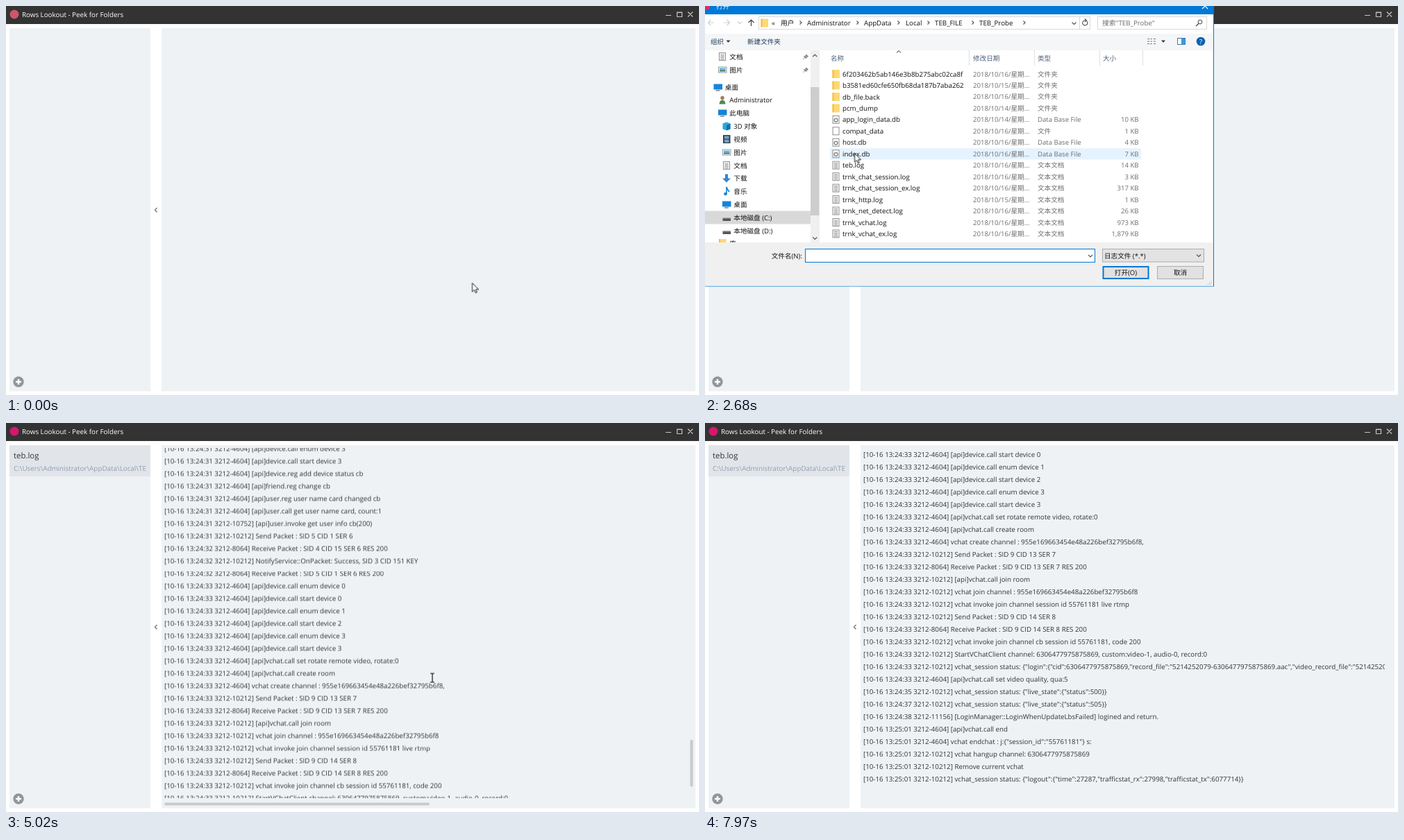
These frames come from a looping animation (998x561 px, 8 s). An HTML page:

```html
<!DOCTYPE html>
<html lang="zh">
<head>
<meta charset="utf-8">
<title>Log viewer</title>
<style>
html, body { margin: 0; width: 100%; height: 100%; overflow: hidden; background: #fff; }
svg { display: block; width: 998px; height: 561px; }
text {
  font-family: 'Open Sans', 'Noto Sans CJK SC', 'Noto Sans CJK', sans-serif;
  text-rendering: geometricPrecision; white-space: pre;
}
.line { fill: none; stroke-width: 1.2; }
</style>
</head>
<body>
<svg viewBox="0 0 998 561">
  <defs>
    <clipPath id="logClip"><path d="M226 36H979V541H226Z"/></clipPath>
    <clipPath id="sideClip"><path d="M5 32H202V77H5Z"/></clipPath>
  </defs>
  <rect width="998" height="561" fill="#fff"/>
  <rect width="998" height="26" fill="#333"/>
  <circle id="mark" cx="12" cy="12" r="6.5" fill="#cc566b"/>
  <path class="line" stroke="#c4c4c4" d="M950 13.5H958M966.5 9.5H973.5V15.5H966.5ZM966 9H974M982 8.5L989 15.5M989 8.5L982 15.5"/>
  <g id="title"></g>
  <path fill="#eef2f5" d="M5 32H208V555.5H5ZM224 32H993V555.5H224Z"/>
  <path class="line" stroke="#888" style="stroke-width:1.6" d="M217.5 291L214.5 294.2 217.5 297.4"/>
  <circle id="add" cx="18" cy="542" r="7.7" fill="#929598"/>
  <path d="M18 538V546M14 542H22" stroke="#fff" stroke-width="2.4"/>
  <g id="entry"></g>
  <g id="log" clip-path="url(#logClip)"><g id="lines"></g></g>
  <g id="bars" fill="#c7cbce">
    <rect x="228" y="547.5" width="382" height="4" rx="2"/>
    <rect id="thumb" x="985.3" y="472.5" width="4" height="68" rx="2"/>
  </g>
  <g id="dialog"></g>
  <g id="cursor">
    <path id="arrow" transform="translate(.5 .5)" fill="#fff" stroke="#000" stroke-width=".9" d="M0 0V12.6L2.9 10 4.8 14.2 6.8 13.4 5 9.2H9Z"/>
    <path id="beam" fill="none" stroke="#000" stroke-width="1.1" d="M-3-6.2H3M0-6.2V6.2M-3 6.2H3"/>
  </g>
</svg>
<script>
const LOOP = 8000, ROW = 16.46, LINE = 18;
const $ = id => document.getElementById(id);

// Text is placed by its visual centre line.
const text = (x, y, s, fill = '#333', size = 9.75, anchor = 'start') =>
  `<text x="${x}" y="${y + size * .37}" fill="${fill}" font-size="${size}" text-anchor="${anchor}">${s}</text>`;
const rect = (x, y, w, h, fill, stroke = 'none') =>
  `<rect x="${x}" y="${y}" width="${w}" height="${h}" fill="${fill}" stroke="${stroke}"/>`;
const line = (d, stroke = '#555') => `<path class="line" d="${d}" stroke="${stroke}"/>`;
const chevron = (x, y, k = 1, stroke) => line(`M${x - 3} ${y - 1.5 * k}L${x} ${y + 1.5 * k} ${x + 3} ${y - 1.5 * k}`, stroke);
const drop = (x, y) => `<path d="M${x - 3} ${y - 1.5}h6l-3 3.2z" fill="#333"/>`;

const sheet = rect(-4.5, -5.5, 9, 11, '#fff', '#8e8e8e');
const icons = {
  folder: rect(-5, -6, 10.5, 12, '#ffd874') + rect(-5, -6, 2, 12, '#f0bd4a'),
  page: sheet,
  text: sheet + line('M-2.8-3H2.8M-2.8-.8H2.8M-2.8 1.4H2.8M-2.8 3.6H2.8', '#9a9a9a'),
  db: sheet + '<circle r="2.4" cy=".8" fill="none" stroke="#8a8a8a" stroke-width="1.5"/>',
  screen: rect(-6, -4.5, 12.5, 8, '#1684d8') + line('M-3 5H3', '#4b6b85'),
  picture: rect(-5.5, -4, 11.5, 8, '#fff', '#8a9aa5') + rect(-4, -2.5, 8.5, 3, '#5cb3ec') + rect(-4, .5, 8.5, 2, '#3f7650'),
  user: '<path d="M-4.5 6Q-4 0 0 0T4.5 6Z" fill="#4c8b57"/><circle cy="-3" r="2.7" fill="#a67c55"/>',
  cube: '<path d="M-5.5-4L0-6 5.5-4V4L0 6-5.5 4Z" fill="#27a9dc"/><path d="M0-1.5L5.5-4V4L0 6Z" fill="#1474ad"/>',
  film: rect(-5, -6, 10.5, 12, '#414141') + rect(-3, -4.5, 6.5, 4, '#6da5d3') + rect(-3, .8, 6.5, 4, '#6da5d3'),
  down: '<path d="M-2-6H2V0H6L0 6-6 0H-2Z" fill="#2f86d6"/>',
  note: '<path d="M0-6Q1-2 4 1" fill="none" stroke="#1684d8" stroke-width="1.8"/><path d="M0-6V4" stroke="#1684d8" stroke-width="1.6"/><circle cx="-1.5" cy="4" r="2.3" fill="#1684d8"/>',
  disk: rect(-5.5, 1, 11.5, 4, '#555') + rect(-5.5, 0, 11.5, 1.5, '#aaa')
};
const icon = (kind, x, y) => `<g transform="translate(${x} ${y})">${icons[kind]}</g>`;

const tree = [
  [25, 73, '文档', 'text'], [25, 92, '图片', 'picture'], [18.5, 117, '桌面', 'screen'],
  [25, 135.5, 'Administrator', 'user'], [25, 154, '此电脑', 'screen'], [31, 173.5, '3D 对象', 'cube'],
  [31, 192, '视频', 'film'], [31, 211, '图片', 'picture'], [31, 230, '文档', 'text'],
  [31, 248.5, '下载', 'down'], [31, 267, '音乐', 'note'], [31, 286, '桌面', 'screen'],
  [31, 305, '本地磁盘 (C:)', 'disk'], [31, 324, '本地磁盘 (D:)', 'disk'], [25, 342, '库', 'folder']
];
const kinds = { folder: '文件夹', db: 'Data Base File', page: '文件', text: '文本文档' };
const files = [
  ['6f203462b5ab146e3b8b275abc02ca8f', 16, 'folder'], ['b3581ed60cfe650fb68da187b7aba262', 15, 'folder'],
  ['db_file.back', 16, 'folder'], ['pcm_dump', 14, 'folder'],
  ['app_login_data.db', 14, 'db', '10'], ['compat_data', 16, 'page', '1'],
  ['host.db', 16, 'db', '4'], ['index.db', 16, 'db', '7'],
  ['teb.log', 16, 'text', '14'], ['trnk_chat_session.log', 16, 'text', '3'],
  ['trnk_chat_session_ex.log', 16, 'text', '317'], ['trnk_http.log', 15, 'text', '1'],
  ['trnk_net_detect.log', 16, 'text', '26'], ['trnk_vchat.log', 16, 'text', '973'],
  ['trnk_vchat_ex.log', 16, 'text', '1,879']
];
const fileRow = ([name, day, kind, size], i) => {
  const y = 98 + i * ROW, grey = '#6d6d6d';
  return icon(kind, 188.5, y) + text(198, y, name, '#111') +
    text(386, y, `2018/10/${day}/星期...`, grey, 9.6) + text(479, y, kinds[kind], grey, 9.6) +
    (size ? text(624.5, y, size + ' KB', grey, 9.6, 'end') : '');
};
const crumbs = [[109, '用户', 138], [147, 'Administrator', 220], [229, 'AppData', 279],
  [289, 'Local', 322], [331, 'TEB_FILE', 386], [395, 'TEB_Probe', 460]];

$('dialog').innerHTML =
  rect(0, 0, 733, 404.5, '#0078d7') + rect(0, 12, 732, 391.5, '#fff') + rect(0, 341, 732, 62.5, '#f0f0f0') +
  '<circle cx="3" cy="1" r="4" fill="#d8316f"/>' + text(16, 0, '打开', '#fff', 9.6) +
  line('M716-4L724 4M724-4L716 4', '#fff') +
  '<g id="content">' +
  // address row
  line('M4.5 24H13M8.5 20L4.5 24 8.5 28M27 24H35.5M31.5 20L35.5 24 31.5 28', '#cfcfcf') + chevron(50, 24, .8, '#ccc') +
  line('M66.5 29V20M62.5 24L66.5 20 70.5 24', '#444') +
  rect(77.5, 15.5, 477, 18, '#fff', '#d9d9d9') + icon('folder', 85.5, 24.5) + text(96, 24, '«', '#222') +
  crumbs.map(([x, s, sep]) => text(x, 24, s, '#111') + line(`M${sep - 1.5} 21.5L${sep + 1} 24 ${sep - 1.5} 26.5`)).join('') +
  chevron(531.5, 25) + line('M539.5 16V33', '#d9d9d9') + line('M550 22A3.6 3.6 0 1 1 546 21L549 20.5M547 18.5L549.5 20.7 547 23') +
  rect(565.5, 15.5, 157, 18, '#fff', '#d9d9d9') + text(572, 24.5, '搜索"TEB_Probe"', '#6d6d6d') +
  '<circle cx="713" cy="23" r="2.9" fill="none" stroke="#444"/>' + line('M711 25.2L707 29', '#444') +
  // toolbar
  rect(0, 40, 732, 24, '#f5f6f7') + text(8, 51, '组织', '#1e395b', 9.6) + drop(33.5, 51) + text(61, 51, '新建文件夹', '#1e395b', 9.6) +
  line('M637 47.5H640M637 51H640M637 54.5H640M641.5 47.5H644M641.5 51H644M641.5 54.5H644M646 47.5H649M646 51H649M646 54.5H649', '#777') +
  drop(660, 51) + rect(680.5, 46.5, 11, 9, '#fff', '#3b78ad') + rect(686, 47, 5.5, 8.5, '#3a97e0') +
  '<circle cx="714" cy="51" r="6.3" fill="#0b61ae"/>' + text(714, 51, '?', '#fff', 9.75, 'middle') +
  // folder tree
  rect(0, 295.5, 152, 19, '#d9d9d9') +
  tree.map(([x, y, s, kind]) => icon(kind, x, y) + text(x + 10.3, y, s, '#111', 9.6)).join('') +
  [73, 92].map(y => `<path d="M141.5 ${y + 4}L144 ${y + 1}M142 ${y - 1}L146 ${y + 3}M143.5 ${y}L146 ${y - 3}L148.5 ${y - .5}L145.5 ${y + 2}Z" fill="#999" stroke="#888"/>`).join('') +
  rect(152, 64, 13, 277, '#f0f0f0') + rect(152, 117, 12.5, 185, '#cdcdcd') + chevron(158.3, 71.5, -1) + chevron(158.3, 335) +
  // file list
  line('M380.5 64V86M474.5 64V86M568.5 64V86M630.5 64V86', '#e3e3e3') + chevron(279, 66, -.9, '#777') +
  [[181, '名称'], [386, '修改日期'], [479, '类型'], [573, '大小']].map(([x, s]) => text(x, 75, s, '#4c607a', 9.6)).join('') +
  `<rect id="hover" x="180" y="89.8" width="448" height="${ROW}" fill="#e5f3ff"/>` +
  files.map(fileRow).join('') +
  // file name and buttons
  rect(0, 341, 732, 62.5, '#f0f0f0') +
  text(140, 360, '文件名(N):', '#111', 9.6, 'end') + rect(144.5, 350.5, 417, 19, '#fff', '#0078d7') + chevron(555, 360.5) +
  `<g id="chosen">${text(148, 360, 'teb.log', '#111')}</g>` +
  rect(572.5, 350.5, 146, 18.5, '#e3e3e3', '#acacac') + text(575, 360, '日志文件 (*.*)', '#111', 9.6) + chevron(711, 360) +
  '<rect x="573.5" y="376" width="65" height="17" fill="#e1e1e1" stroke="#0078d7" stroke-width="2"/>' +
  text(606, 384, '打开(O)', '#111', 9.6, 'middle') +
  rect(651.5, 375.5, 66, 18, '#e1e1e1', '#adadad') + text(684.5, 384, '取消', '#111', 9.6, 'middle') +
  '<path d="M724 402L730 396M727 402L730 399" stroke="#aaa" stroke-dasharray="1.5 1.5"/></g>';

$('title').innerHTML = text(23, 12.5, 'Rows Lookout - Peek for Folders', '#fff', 9.8);
$('entry').innerHTML = rect(5, 32, 203, 45, '#e1e5ea') + text(11, 46.5, 'teb.log', '#333', 11.4) +
  `<g clip-path="url(#sideClip)">${text(11, 65, 'C:\\Users\\Administrator\\AppData\\Local\\TEB_FILE\\TEB_Probe', '#8f9fb0', 9.85)}</g>`;

// minute:second, thread, message
const entries = String.raw`24:31 4604 [api]device.call enum device 0
24:31 4604 [api]device.call start device 0
24:31 4604 [api]device.call enum device 1
24:31 4604 [api]device.call start device 2
24:31 4604 [api]device.call enum device 3
24:31 4604 [api]device.call start device 3
24:31 4604 [api]device.reg add device status cb
24:31 4604 [api]friend.reg change cb
24:31 4604 [api]user.reg user name card changed cb
24:31 4604 [api]user.call get user name card, count:1
24:31 10752 [api]user.invoke get user info cb(200)
24:31 10212 Send Packet : SID 5 CID 1 SER 6
24:32 8064 Receive Packet : SID 4 CID 15 SER 6 RES 200
24:32 10212 NotifyService::OnPacket: Success, SID 3 CID 151 KEY
24:32 8064 Receive Packet : SID 5 CID 1 SER 6 RES 200
24:33 4604 [api]device.call enum device 0
24:33 4604 [api]device.call start device 0
24:33 4604 [api]device.call enum device 1
24:33 4604 [api]device.call start device 2
24:33 4604 [api]device.call enum device 3
24:33 4604 [api]device.call start device 3
24:33 4604 [api]vchat.call set rotate remote video, rotate:0
24:33 4604 [api]vchat.call create room
24:33 4604 vchat create channel : 955e169663454e48a226bef32795b6f8,
24:33 10212 Send Packet : SID 9 CID 13 SER 7
24:33 8064 Receive Packet : SID 9 CID 13 SER 7 RES 200
24:33 10212 [api]vchat.call join room
24:33 10212 vchat join channel : 955e169663454e48a226bef32795b6f8
24:33 10212 vchat invoke join channel session id 55761181 live rtmp
24:33 10212 Send Packet : SID 9 CID 14 SER 8
24:33 8064 Receive Packet : SID 9 CID 14 SER 8 RES 200
24:33 10212 vchat invoke join channel cb session id 55761181, code 200
24:33 10212 StartVChatClient channel: 6306477975875869, custom:video-1, audio-0, record:0
24:33 10212 vchat_session status: {"login":{"cid":6306477975875869,"record_file":"5214252079-6306477975875869.aac","video_record_file":"5214252079-6306477975875869.mp4"}}
24:33 4604 [api]vchat.call set video quality, qua:5
24:35 10212 vchat_session status: {"live_state":{"status":500}}
24:37 10212 vchat_session status: {"live_state":{"status":505}}
24:38 11156 [LoginManager::LoginWhenUpdateLbsFailed] logined and return.
25:01 4604 [api]vchat.call end
25:01 4604 vchat endchat : j:{"session_id":"55761181"} s:
25:01 10212 vchat hangup channel: 6306477975875869
25:01 10212 Remove current vchat
25:01 10212 vchat_session status: {"logout":{"time":27287,"trafficstat_rx":27998,"trafficstat_tx":6077714}}`.split('\n');
const appended = 5, settled = entries.length - appended;
$('lines').innerHTML = entries.map((entry, i) => {
  const [time, thread, ...words] = entry.split(' ');
  return text(228, 513.7 - LINE * (settled - 1 - i), `[10-16 13:${time} 3212-${thread}] ${words.join(' ')}`);
}).join('');

// Stepped tracks: [time in ms, value]
const play = (el, prop, steps) => el.animate(
  steps.map(([t, value]) => ({ offset: Math.max(0, t - 2) / LOOP, [prop]: value, easing: 'step-end' })),
  { duration: LOOP, iterations: Infinity });
const fade = (id, ...steps) => play($(id), 'opacity', [[0, 0], ...steps]);
const glide = (from, to, count, path) => Array.from({ length: count }, (_, i) =>
  [from + (to - from) * i / (count - 1), ...path((i + 1) / count)]);
const mix = (a, b, p) => a + (b - a) * p;

const pointer = [
  [0, 671, 399], [70, 543, 318],
  ...glide(290, 980, 10, p => {
    const e = Math.sin(p * Math.PI / 2);
    return [mix(543, 19, e), 305 + 240 * e * e];
  }),
  [1750, 40, 460], [1840, 75, 385],
  ...glide(1990, 2680, 10, p => [mix(75, 215, p), mix(385, 212, p)]),
  [2760, 224, 222.5], [3920, 229, 222],
  ...glide(4170, 4320, 3, p => [mix(229, 614, p), mix(222, 367.5, p)]),
  [5880, 700, 345], [5950, 850, 338.5], [6030, 1020, 335]
];
play($('cursor'), 'transform', pointer.map(([t, x, y]) => [t, `translate(${x}px, ${y}px)`]));
play($('arrow'), 'opacity', [[0, 1], [3240, 0]]);
fade('beam', [3240, 1]);
play($('add'), 'fill', [[0, '#929598'], [980, '#879190'], [1670, '#929598']]);
play($('mark'), 'fill', [[0, '#cc566b'], [3310, '#d6186e']]);

fade('dialog', [1670, .5], [1750, .85], [1840, 1], [3160, .5], [3240, 0]);
fade('content', [1990, 1]);
fade('chosen', [2920, 1]);
const over = pointer.filter(([t, x]) => t >= 1990 && t <= 2760 && x > 180);
play($('hover'), 'transform', [[0, 'translate(0px, 0px)'],
  ...over.map(([t, , y]) => [t, `translate(0px, ${Math.floor((y - 89.8) / ROW) * ROW}px)`])]);
fade('hover', [over[0][0], 1]);
play($('hover'), 'fill', [[0, '#e5f3ff'], [2920, '#cce8ff']]);

fade('entry', [3310, 1]);
fade('log', [3470, 1]);
fade('bars', [3920, .2], [4010, .4], [4170, .6], [4245, .8], [4320, 1], [5950, .7], [6030, .4], [6180, 0]);

const scroll = [[0, 0], [4630, 11], [4710, 28], [4790, 50], [4870, 72], [4950, 95], [5020, 117.5], [5100, 138],
  [5180, 152], [5250, 160], [5410, 120], [5490, 72], [5560, 36], [5640, 12], [5710, 0]];
const shift = (id, steps, ratio = 1) =>
  play($(id), 'transform', steps.map(([t, y]) => [t, `translate(0px, ${y * ratio}px)`]));
shift('lines', [...scroll, [7900, -3 * LINE], [7970, -appended * LINE]]);
shift('thumb', scroll, -.136);
[...$('lines').children].slice(settled).forEach((el, i) =>
  play(el, 'opacity', [[0, 0], [i < 3 ? 7900 : 7970, 1]]));
</script>
</body>
</html>
```
